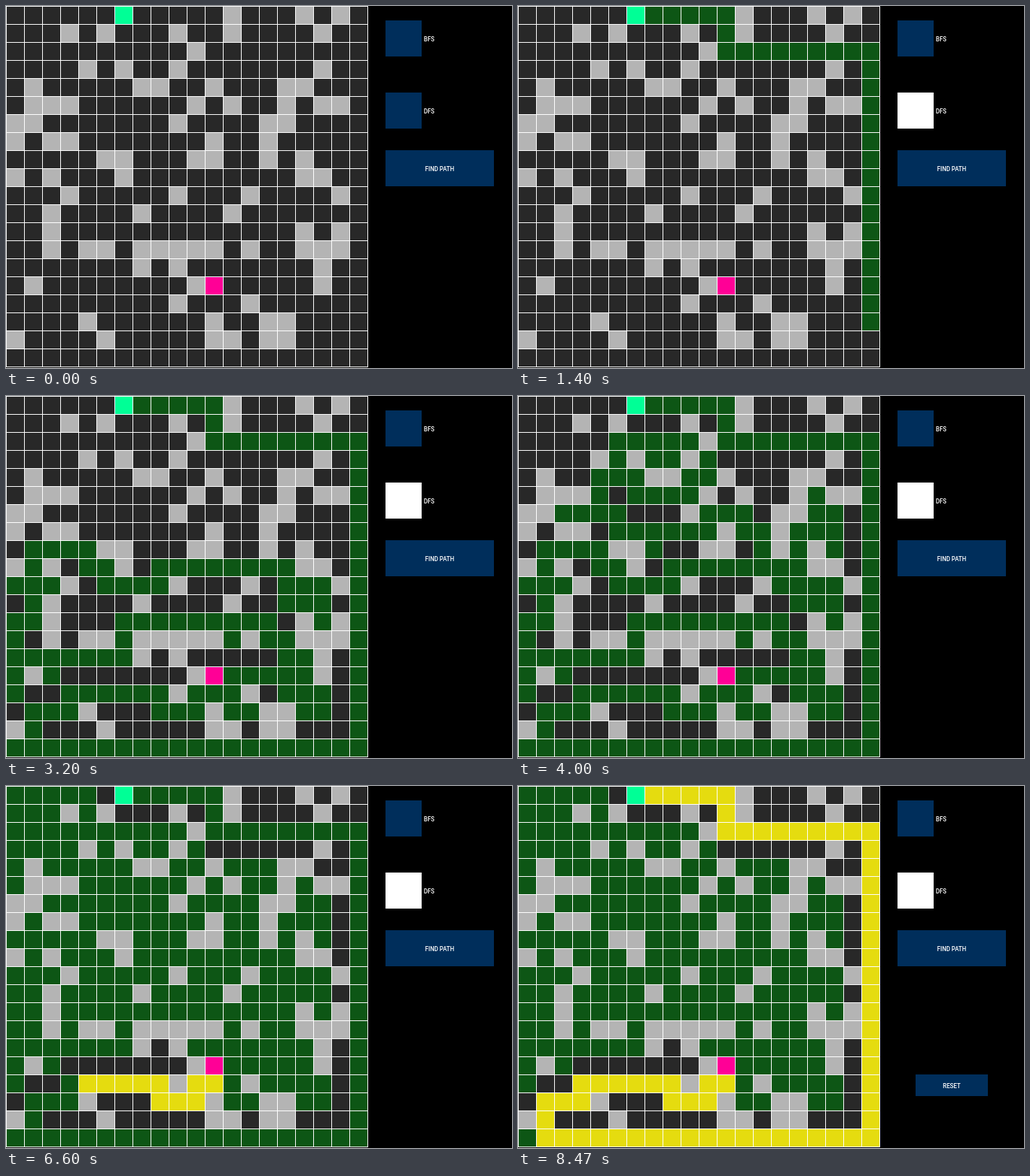
Recreate the animation shown at these times as an HTML page. Size 700 by 502 pixels, loop 9.39 s.

```html
<!DOCTYPE html>
<html lang="en">
<head>
<meta charset="utf-8">
<title>Depth-first path finder</title>
<style>
  html, body { margin: 0; width: 100%; height: 100%; overflow: hidden; background: #000; }
  svg { display: block; width: 700px; height: 502px; }
  .button { fill: #002e5b; }
  text { fill: #fff; font: 500 8.2px Roboto, "Noto Sans", sans-serif; }
  .centered { text-anchor: middle; }
</style>
</head>
<body>
<svg viewBox="0 0 700 502" shape-rendering="crispEdges">
  <rect width="700" height="502"/>
  <rect width="501" height="501" fill="#fff"/>
  <g id="grid"></g>
  <rect class="button" x="525" y="20" width="50" height="50"/>
  <text x="578" y="49">BFS</text>
  <rect class="button" id="dfs" x="525" y="120" width="50" height="50"/>
  <text x="578" y="149">DFS</text>
  <rect class="button" id="find" x="525" y="200" width="150" height="50"/>
  <text class="centered" x="600" y="229">FIND PATH</text>
  <g id="reset">
    <rect class="button" x="550" y="400" width="100" height="30"/>
    <text class="centered" x="600" y="419">RESET</text>
  </g>
</svg>
<script>
const LOOP = 9390, FPS = 15, SIZE = 20, STEP = 25;
const START = 6, GOAL = 15 * SIZE + 11;
const COLORS = {
  empty: '#282828', wall: '#b4b4b4', start: '#00ff96', goal: '#ff0096',
  visited: '#0d5615', path: '#e5dc0f', hover: '#00509e', idle: '#002e5b', on: '#fff'
};
// Wall columns, row by row
const WALLS = [
  [12, 16, 18], [3, 5, 9, 12, 17], [10], [4, 6, 9, 17], [1, 7, 8, 11, 15, 16],
  [1, 2, 3, 10, 12, 15, 17, 18], [0, 1, 9, 14, 15], [0, 2, 3, 11, 14],
  [5, 6, 10, 11, 14, 16], [0, 2, 6, 16, 17], [3, 9, 13, 18], [2, 7, 12],
  [2, 16, 18], [2, 4, 5, 7, 8, 9, 10, 11, 13, 16, 17, 18], [7, 9, 17],
  [1, 10, 17], [9, 13], [4, 11, 14, 15], [0, 5, 11, 12, 14, 15], []
];
const byId = id => document.getElementById(id);
const isWall = (row, col) => WALLS[row].includes(col);

// Stack search: neighbours are marked when pushed, coloured when popped
function search() {
  const parent = new Map([[START, null]]), stack = [START], visited = [];
  while (stack.length) {
    const cell = stack.pop();
    if (cell === GOAL) break;
    if (cell !== START) visited.push(cell);
    const row = Math.floor(cell / SIZE), col = cell % SIZE;
    for (const [dr, dc] of [[-1, 0], [0, -1], [1, 0], [0, 1]]) {
      const r = row + dr, c = col + dc, next = r * SIZE + c;
      if (r < 0 || c < 0 || r >= SIZE || c >= SIZE) continue;
      if (isWall(r, c) || parent.has(next)) continue;
      parent.set(next, cell);
      stack.push(next);
    }
  }
  const path = [];
  for (let p = parent.get(GOAL); p !== START; p = parent.get(p)) path.push(p);
  return { visited, path };
}

const baseColor = cell =>
  cell === START ? COLORS.start :
  cell === GOAL ? COLORS.goal :
  isWall(Math.floor(cell / SIZE), cell % SIZE) ? COLORS.wall : COLORS.empty;

const base = Array.from({ length: SIZE * SIZE }, (_, cell) => baseColor(cell));
const cells = base.map((color, cell) => {
  const rect = document.createElementNS('http://www.w3.org/2000/svg', 'rect');
  const attrs = {
    x: cell % SIZE * STEP + 1, y: Math.floor(cell / SIZE) * STEP + 1,
    width: STEP - 1, height: STEP - 1, fill: color
  };
  for (const name in attrs) rect.setAttribute(name, attrs[name]);
  return byId('grid').appendChild(rect);
});
const { visited, path } = search();
const clamp = (v, lo, hi) => Math.min(hi, Math.max(lo, v));

// Four cells per tick, with a slight slowdown midway
function visitedCount(tick) {
  const k = tick - 13;
  const lag = clamp(Math.floor((k - 28) / 4), 0, 4);
  return clamp(4 * k - 2 - lag, 0, visited.length);
}

function pathCount(tick) {
  const k = tick - 94;
  return k < 0 ? 0 : clamp(2 * k, 1, path.length);
}

function draw(tick) {
  const colors = base.slice();
  visited.slice(0, visitedCount(tick)).forEach(c => colors[c] = COLORS.visited);
  path.slice(0, pathCount(tick)).forEach(c => colors[c] = COLORS.path);
  cells.forEach((rect, i) => rect.setAttribute('fill', colors[i]));
  byId('dfs').style.fill = tick < 3 ? COLORS.idle : tick < 7 ? COLORS.hover : COLORS.on;
  byId('find').style.fill = tick >= 9 && tick < 13 ? COLORS.hover : COLORS.idle;
  byId('reset').style.display = tick >= 127 ? '' : 'none';
}

const origin = performance.now();
let lastTick = -1;
function frame() {
  const time = Math.max(0, performance.now() - origin) % LOOP;
  const tick = Math.floor((Math.floor(time / 10) * 10 + 5) * FPS / 1000);
  if (tick !== lastTick) draw(lastTick = tick);
  requestAnimationFrame(frame);
}
frame();
</script>
</body>
</html>
```
